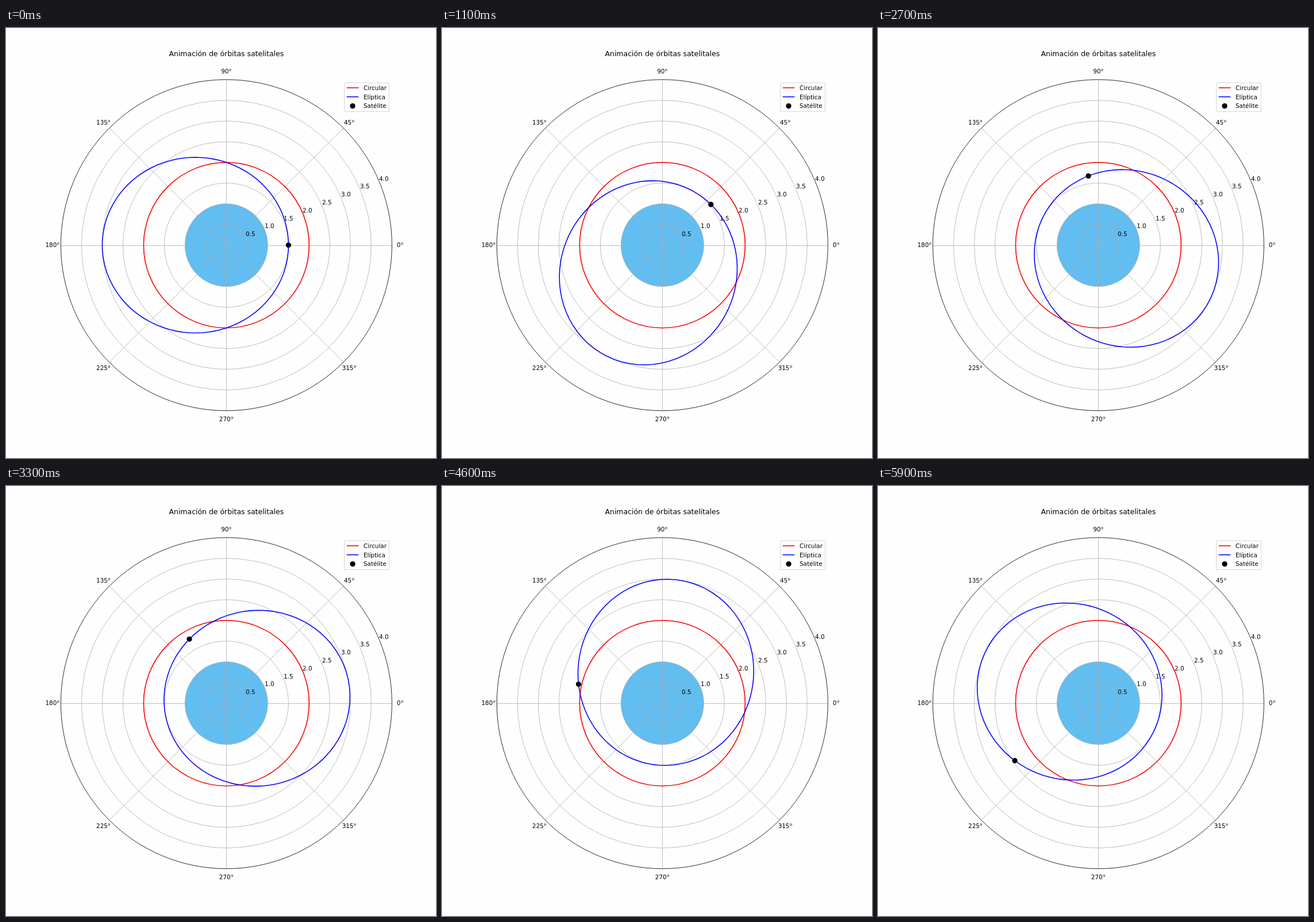
These frames come from a looping animation (748 by 748 pixels, 6 s). An HTML page with a canvas:

```html
<!DOCTYPE html>
<html lang="es">
<head>
<meta charset="utf-8">
<title>Animación de órbitas satelitales</title>
<style>
  html, body { margin: 0; width: 100%; height: 100%; overflow: hidden; background: #fefefe; }
  canvas { display: block; }
</style>
</head>
<body>
<canvas id="stage" width="748" height="748"></canvas>
<script>
const ctx = document.getElementById('stage').getContext('2d');
const SIZE = 748, PT = SIZE / 720, TAU = 2 * Math.PI;
const CX = SIZE * 0.5125, CY = SIZE * 0.505, UNIT = SIZE * 0.09625;
const STEP_MS = 100, STEPS = 60, POINTS = 100;
const PARAMETER = 2, ECCENTRICITY = 1 / 3, PRECESSION = 0.1;
const LINE = 1.5 * PT, GRID = 0.8 * PT;

const polar = (r, a) => [CX + r * UNIT * Math.cos(a), CY - r * UNIT * Math.sin(a)];
const sample = i => i * TAU / (POINTS - 1);

function stroke(color, width) {
  ctx.strokeStyle = color;
  ctx.lineWidth = width;
  ctx.stroke();
}

function circle(x, y, r) {
  ctx.beginPath();
  ctx.arc(x, y, r, 0, TAU);
}

function ring(r, color, width) {
  circle(CX, CY, r * UNIT);
  stroke(color, width);
}

function segment(x1, y1, x2, y2, color, width) {
  ctx.beginPath();
  ctx.moveTo(x1, y1);
  ctx.lineTo(x2, y2);
  stroke(color, width);
}

function dot(x, y) {
  circle(x, y, 4.5 * PT);
  ctx.fillStyle = '#000';
  ctx.fill();
}

function label(text, x, y, align, points = 10) {
  ctx.font = `${points * PT}px "DejaVu Sans", sans-serif`;
  ctx.textAlign = align;
  ctx.fillStyle = '#000';
  ctx.fillText(text, x, y);
}

function drawGrid() {
  const gray = '#b0b0b0';
  circle(CX, CY, UNIT);
  ctx.fillStyle = '#62bdf0';
  ctx.fill();

  // Axis-aligned spokes sit on whole pixels.
  const left = CX - 4 * UNIT, top = CY - 4 * UNIT;
  segment(left, 378.5, left + 8 * UNIT, 378.5, gray, GRID);
  segment(383.5, top, 383.5, top + 8 * UNIT, gray, GRID);
  for (const a of [TAU / 8, 3 * TAU / 8]) {
    segment(...polar(4, a), ...polar(-4, a), gray, GRID);
  }
  for (let r = 0.5; r < 4; r += 0.5) ring(r, gray, GRID);

  for (let i = 0; i < 8; i++) {
    const [x, y] = polar(4.2, i * TAU / 8);
    label(`${i * 45}°`, x, Math.round(y + 3.6), 'center');
  }
  for (let r = 0.5; r <= 4; r += 0.5) {
    const [x, y] = polar(r, TAU / 16);
    label(r.toFixed(1), Math.round(x), Math.round(y - 1.9), 'left');
  }
}

function drawLegend() {
  ctx.beginPath();
  ctx.roundRect(588.5, 95.2, 78, 50.3, 2.1);
  ctx.fillStyle = 'rgba(255,255,255,.8)';
  ctx.fill();
  stroke('rgba(204,204,204,.8)', PT);
  segment(592.6, 104, 613.4, 104, '#f00', LINE);
  segment(592.6, 119.7, 613.4, 119.7, '#00f', LINE);
  dot(603, 135.6);
  ['Circular', 'Elíptica', 'Satélite'].forEach((name, i) =>
    label(name, 622, Math.round(108 + i * 15.6), 'left'));
}

function draw(step) {
  const radius = a => PARAMETER / (1 + ECCENTRICITY * Math.cos(a - step * PRECESSION));
  ctx.fillStyle = '#fefefe';
  ctx.fillRect(0, 0, SIZE, SIZE);
  drawGrid();
  ring(2, '#f00', LINE);

  ctx.beginPath();
  for (let i = 0; i < POINTS; i++) {
    const a = sample(i);
    ctx.lineTo(...polar(radius(a), a));
  }
  stroke('#00f', LINE);

  const angle = sample(step);
  dot(...polar(radius(angle), angle));
  ring(4, '#000', GRID);
  label('Animación de órbitas satelitales', CX, 49, 'center', 12);
  drawLegend();
}

function tick() {
  draw(Math.floor(performance.now() / STEP_MS) % STEPS);
  requestAnimationFrame(tick);
}
tick();
</script>
</body>
</html>
```
